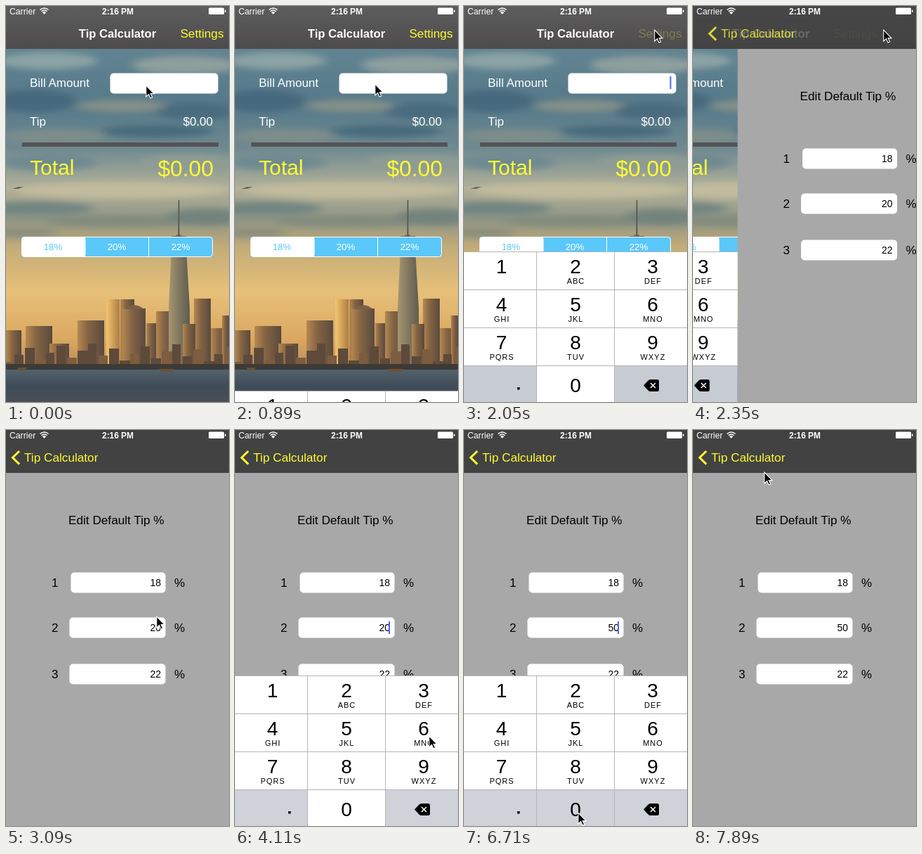
Animation, 318 px wide and 563 px high, one loop 8 s. Source, as an HTML page:

```html
<!DOCTYPE html>
<html lang="en">
<head>
<meta charset="utf-8">
<title>Tip Calculator</title>
<style>
  html, body { margin: 0; width: 100%; height: 100%; overflow: hidden; background: #a8a8a8; }
  svg { display: block; width: 100%; height: 100%; }
  text { font-family: "Liberation Sans", Arial, sans-serif; font-size: 17px; }
  .mid { text-anchor: middle; }
  .end { text-anchor: end; }
  .abc { font-size: 11px; letter-spacing: 1px; }
  .bold { font-weight: bold; }
</style>
</head>
<body>
<svg viewBox="0 0 318 563" preserveAspectRatio="none">
  <defs>
    <linearGradient id="sky" x2="0" y2="1">
      <stop offset="0" stop-color="#6c8c98"/>
      <stop offset=".25" stop-color="#55798a"/>
      <stop offset=".36" stop-color="#6f8a90"/>
      <stop offset=".46" stop-color="#b3b199"/>
      <stop offset=".54" stop-color="#8f9584"/>
      <stop offset=".61" stop-color="#c4ac78"/>
      <stop offset=".72" stop-color="#e6c079"/>
      <stop offset=".84" stop-color="#dba862"/>
      <stop offset=".92" stop-color="#b98a58"/>
    </linearGradient>
    <linearGradient id="water" x2="0" y2="1">
      <stop offset="0" stop-color="#53626a"/>
      <stop offset=".5" stop-color="#3d4c58"/>
      <stop offset="1" stop-color="#4b4f57"/>
    </linearGradient>
    <linearGradient id="wall">
      <stop offset="0" stop-color="#b58850"/>
      <stop offset=".4" stop-color="#846444"/>
      <stop offset="1" stop-color="#5a4a3e"/>
    </linearGradient>
    <linearGradient id="lit">
      <stop offset="0" stop-color="#f3c56c"/>
      <stop offset="1" stop-color="#ad7c45"/>
    </linearGradient>
    <linearGradient id="tower">
      <stop offset="0" stop-color="#a79570"/>
      <stop offset=".5" stop-color="#80785f"/>
      <stop offset="1" stop-color="#5f5c50"/>
    </linearGradient>
    <linearGradient id="glass" x2="0" y2="1">
      <stop offset="0" stop-color="#5e5d5d"/>
      <stop offset="1" stop-color="#4d4b4c"/>
    </linearGradient>
    <filter id="soft" x="-30%" y="-100%" width="160%" height="300%">
      <feGaussianBlur stdDeviation="7 4"/>
    </filter>
  </defs>
  <g id="home"></g>
  <g id="prefs"></g>
  <g id="bar"></g>
  <g id="pad"></g>
  <g id="cursor"></g>
</svg>
<script>
const YELLOW = '#fffb32', BLUE = '#5ac8fa', CARET = '#426bf2';
const $ = id => document.getElementById(id);

function add(parent, tag, attrs, text) {
  const el = document.createElementNS('http://www.w3.org/2000/svg', tag);
  for (const k in attrs) el.setAttribute(k, attrs[k]);
  if (text !== undefined) el.textContent = text;
  return parent.appendChild(el);
}
const rect = (g, x, y, width, height, fill, rx = 0) =>
  add(g, 'rect', { x, y, width, height, fill, rx });
const path = (g, d, fill, stroke = 'none', w = 1) =>
  add(g, 'path', { d, fill, stroke, 'stroke-width': w });
const label = (g, x, y, text, fill, cls = '', size = 0) =>
  add(g, 'text', { x, y, fill, class: cls, style: size ? `font-size:${size}px` : '' }, text);

function drawScene(g) {
  rect(g, 0, 0, 318, 563, 'url(#sky)');
  const clouds = add(g, 'g', { filter: 'url(#soft)' });
  [
    [60, 78, 70, 12, '#8ba3a5'], [255, 84, 75, 13, '#8e9f9e'],
    [40, 135, 60, 16, '#47697d'], [165, 142, 65, 9, '#849088'],
    [270, 150, 55, 12, '#4a6c7e'], [215, 178, 80, 9, '#476a7c'],
    [70, 185, 75, 10, '#7d8d8a'], [60, 222, 70, 12, '#6f8a92'],
    [260, 222, 70, 11, '#8f9c94'], [165, 262, 150, 11, '#c2bc9e'],
    [40, 288, 85, 10, '#728581'], [165, 306, 110, 8, '#828b7e'],
    [285, 300, 55, 12, '#73837d'], [20, 322, 55, 7, '#8b8e7b']
  ].forEach(([cx, cy, rx, ry, fill]) => add(clouds, 'ellipse', { cx, cy, rx, ry, fill }));
  path(g, 'M9 260L17 257.5L25 257L18 259.5Z', '#4b524f');

  [
    [0, 461, 22], [28, 455, 38], [62, 480, 28], [102, 447, 38], [163, 417, 20],
    [166, 430, 33], [200, 451, 14], [214, 434, 28], [268, 416, 24], [292, 458, 26], [308, 440, 10]
  ].forEach(([x, y, w]) => rect(g, x, y, w, 517 - y, 'url(#wall)'));
  rect(g, 143, 417, 19, 98, 'url(#lit)');
  path(g, 'M168 431Q182 419 197 431Z', '#786049');
  path(g, 'M246 276L247.5 325H250V329H257V345L262 430V516H232V430L236 345V329H242V325H245Z', 'url(#tower)');
  path(g, 'M246.5 276V330M236 328H257', 'none', '#4f5149', 1.4);
  rect(g, 252, 452, 18, 64, 'url(#wall)');
  for (let i = 0; i < 22; i++) {
    const h = 9 + (i * 37 % 27);
    rect(g, i * 15 - 3, 515 - h, 12 + i % 4, h, i % 3 ? '#5d4a3b' : '#7c5d3f');
  }
  rect(g, 0, 509, 318, 9, '#3d3a36');
  rect(g, 0, 517, 318, 46, 'url(#water)');
  path(g, 'M16 514H30L27 518H18ZM218 516H240L237 520H221Z', '#6d4f35');
}

function drawHome(g) {
  drawScene(g);
  label(g, 34, 114.5, 'Bill Amount', '#fff');
  rect(g, 148.5, 95.5, 154, 29, '#fff', 5);
  label(g, 34, 169.5, 'Tip', '#fff');
  label(g, 295, 169.5, '$0.00', '#fff', 'end');
  rect(g, 23, 194, 280, 6, '#555254');
  label(g, 34, 240, 'Total', YELLOW, '', 30);
  label(g, 296, 242, '$0.00', YELLOW, 'end', 31.8);
  rect(g, 22, 328, 273, 29, BLUE);
  rect(g, 22.5, 328.5, 91, 28, '#fff', 4);
  rect(g, 100, 328.5, 13, 28, '#fff');
  add(g, 'rect', { x: 22.5, y: 328.5, width: 272, height: 28, rx: 4, fill: 'none', stroke: '#fff' });
  rect(g, 203, 328, 1, 29, '#fff');
  ['18%', '20%', '22%'].forEach((s, i) =>
    label(g, 67 + i * 91, 347, s, i ? '#fff' : BLUE, 'mid', 13.3));
  return rect(g, 293.5, 100, 2, 18, CARET);
}

function drawPrefs(g) {
  rect(g, 0, 0, 318, 563, '#a8a8a8');
  label(g, 89, 134, 'Edit Default Tip %', '#000', '', 17.2);
  const values = [[92.5, 203, 18], [90.5, 267, 20], [90.5, 333, 22]].map(([x, y, v], i) => {
    rect(g, x, y - .5, 227.5 - x, 29, '#fff', 5);
    label(g, 65, y + 19.5, i + 1, '#000');
    label(g, 240, y + 19.5, '%', '#000');
    return label(g, 221, y + 19, v, '#000', 'end', 14);
  });
  return [values[1], rect(g, 219, 272, 2, 18, CARET)];
}

function drawBar(g) {
  rect(g, 0, 0, 318, 61, 'url(#glass)');
  const dark = rect(g, 0, 0, 318, 61, '#424242');
  const homeItems = add(g, 'g', {});
  label(homeItems, 159, 45, 'Tip Calculator', '#fff', 'mid bold', 16.6);
  const link = label(homeItems, 310.5, 45, 'Settings', YELLOW, 'end', 17.2);
  const prefItems = add(g, 'g', {});
  path(prefItems, 'M19 30L9.5 39.3L19 48.6', 'none', YELLOW, 3);
  label(prefItems, 26, 45, 'Tip Calculator', YELLOW, '', 17.2);
  label(g, 5, 11.5, 'Carrier', '#fff', '', 12.2);
  label(g, 159.5, 11.5, '2:16 PM', '#fff', 'mid bold', 11.9);
  path(g, 'M48.5 5.5Q54.5 .5 60.5 5.5M50.5 7.8Q54.5 4.3 58.5 7.8', 'none', '#fff', 1.5);
  path(g, 'M54.5 11.8L51.9 9.2Q54.5 7 57.1 9.2Z', '#fff');
  rect(g, 289, 2.5, 22, 9.5, '#fff', 1.5);
  rect(g, 312, 5.5, 1.5, 3.5, '#fff', .7);
  return { dark, homeItems, link, prefItems };
}

function drawPad(g) {
  const edges = [0, 103.5, 214.5, 318], mids = [53.5, 159, 269];
  rect(g, 0, 0, 318, 162, '#fff');
  const keys = [0, 1, 2].map(i => rect(g, edges[i], 162, edges[i + 1] - edges[i], 52, '#fff'));
  ['', 'ABC', 'DEF', 'GHI', 'JKL', 'MNO', 'PQRS', 'TUV', 'WXYZ'].forEach((s, i) => {
    const x = mids[i % 3], y = 54 * Math.floor(i / 3);
    label(g, x, y + 30.5, i + 1, '#000', 'mid', 28);
    label(g, x + .5, y + 45.5, s, '#000', 'mid abc');
  });
  label(g, mids[1], 199.5, 0, '#000', 'mid', 28);
  rect(g, 76, 193, 3.5, 3.5, '#000');
  path(g, 'M256 190.5L262.5 183.5Q264 182 266 182H275.5Q278 182 278 184.5V196.5Q278 199 275.5 199H266Q264 199 262.5 197.5Z', '#000');
  path(g, 'M266 187L273 194M273 187L266 194', 'none', '#fff', 1.5);
  path(g, 'M0 .5H318M0 54.5H318M0 108.5H318M0 162.5H318M103.5 0V214M214.5 0V214', 'none', '#b4b5b9', 1);
  return keys;
}

const homeCaret = drawHome($('home'));
const [tipText, tipCaret] = drawPrefs($('prefs'));
const bar = drawBar($('bar'));
const [dotKey, zeroKey, delKey] = drawPad($('pad'));
path($('cursor'), 'M.8 1.2V17L4.6 13.5L7 19L9.6 17.9L7.2 12.6H12Z', '#000', '#fff', 1.1);

// Start of each burst of ticks: [ms, tick]
const BURSTS = [[0, 0], [890, 6], [2050, 14], [3230, 22], [4410, 30], [5560, 38], [6710, 46], [7890, 54]];
const PUSH = [[14, 0], [15, .3], [16, .8], [17, .97], [18, 1]];
const PAD_Y = [
  [5, 563], [6, 547], [7, 400], [8, 352], [9, 349], [18, 349], [19, 563],
  [21, 563], [22, 520], [23, 385], [24, 351], [25, 349],
  [50, 349], [51, 372], [52, 500], [53, 563]
];
const POINTER = [
  [0, 199, 112], [2, 199, 111], [5, 199, 111], [6, 199, 110], [8, 199, 110], [12, 268, 40],
  [13, 271, 33], [16, 271, 33], [20, 216, 258], [21, 214, 264], [23, 214, 264], [28, 276, 434],
  [31, 265, 536], [34, 265, 536], [35, 255, 525], [37, 186, 450], [38, 164, 428],
  [41, 164, 428], [45, 162, 540], [46, 162, 543], [47, 162, 543], [51, 201, 97],
  [53, 201, 97], [54, 101, 59]
];
const TIP = [[0, '20'], [32, '2'], [34, ''], [40, '5'], [46, '50']];

const last = (rows, v) => rows.filter(r => r[0] <= v).pop();
function track(rows, n, col = 1) {
  const i = rows.findIndex(r => r[0] >= n);
  if (i < 0) return rows[rows.length - 1][col];
  if (i === 0) return rows[0][col];
  const a = rows[i - 1], b = rows[i];
  return a[col] + (b[col] - a[col]) * (n - a[0]) / (b[0] - a[0]);
}
function tickAt(ms) {
  const [start, tick] = last(BURSTS, ms);
  const size = tick ? 8 : 6;
  return tick + Math.min(size - 1, Math.floor((ms - start + 8) / 147 * (tick ? 1 : 1.02)));
}
const move = (el, x, y) => el.setAttribute('transform', `translate(${x} ${y})`);
const show = (el, on) => el.setAttribute('opacity', +on);

function render(ms) {
  const n = tickAt(ms), p = track(PUSH, n);
  const first = n < 19;
  move($('home'), -95 * p, 0);
  move($('prefs'), 318 * (1 - p), 0);
  move($('pad'), first ? -318 * p : 0, track(PAD_Y, n));
  move($('cursor'), Math.round(track(POINTER, n, 1)), Math.round(track(POINTER, n, 2)));

  show(bar.dark, p);
  show(bar.homeItems, 1 - p);
  show(bar.prefItems, p);
  move(bar.homeItems, -60 * p, 0);
  move(bar.prefItems, 70 * (1 - p), 0);
  show(bar.link, n >= 14 ? .25 : 1);

  show(homeCaret, n >= 7);
  show(tipCaret, n >= 22 && n < 51);
  tipText.textContent = last(TIP, n)[1];

  const gray = first ? '#c7ccd3' : '#cfd2d9';
  dotKey.setAttribute('fill', gray);
  zeroKey.setAttribute('fill', n === 46 ? gray : '#fff');
  delKey.setAttribute('fill', n === 32 || n === 34 ? '#fff' : gray);
}

const t0 = performance.now();
function loop() {
  render((performance.now() - t0) % 8000);
  requestAnimationFrame(loop);
}
loop();
</script>
</body>
</html>
```
